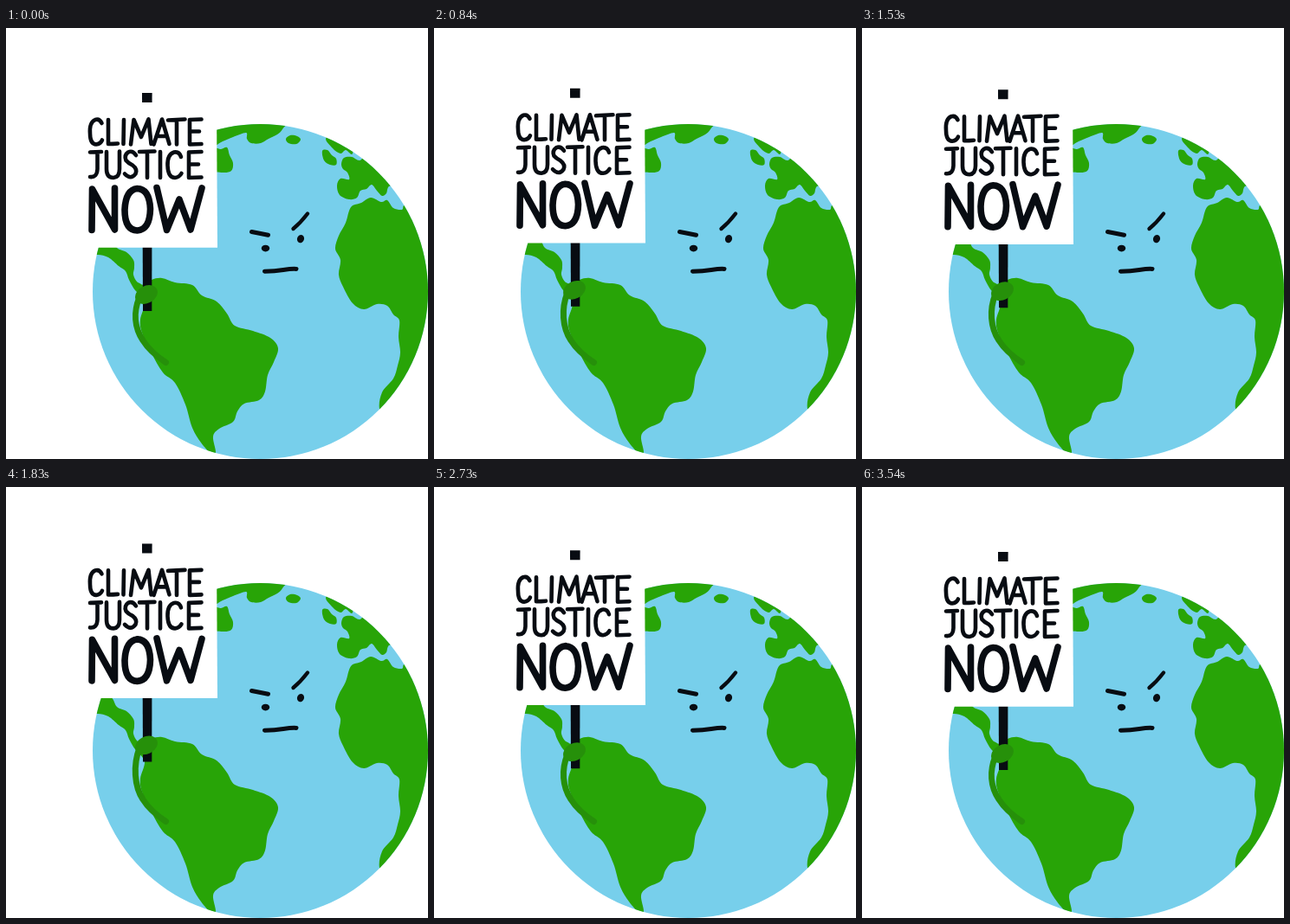
These frames come from a looping animation (487x498 px, 3600 ms). An HTML page:

```html
<!DOCTYPE html>
<html lang="en">
<head>
<meta charset="utf-8">
<title>Climate justice now</title>
<style>
  html, body { margin: 0; width: 100%; height: 100%; overflow: hidden; background: #fff; }
  svg { display: block; width: 487px; height: 498px; }
  .ink { fill: none; stroke: #080c12; stroke-linecap: round; stroke-linejoin: round; }
</style>
</head>
<body>
<svg viewBox="0 0 487 498" role="img" aria-label="Angry Earth holding a sign: CLIMATE JUSTICE NOW">
  <clipPath id="disc"><circle cx="293.5" cy="304.5" r="193.5"/></clipPath>
  <g clip-path="url(#disc)">
    <rect width="487" height="498" fill="#77cfeb"/>
    <g id="land" fill="#28a407"></g>
  </g>

  <g class="ink">
    <path stroke-width="5" d="M283.5 235.5Q292 237 302.5 239.3M298.5 281.2Q310 281 320 279.5T335 278.4"/>
    <path stroke-width="4.4" d="M331.5 232Q340 225 348 214.5"/>
  </g>
  <g fill="#080c12">
    <ellipse cx="299.5" cy="254.6" rx="4.7" ry="3.9"/>
    <ellipse cx="340" cy="243.6" rx="4" ry="4.7" transform="rotate(20 340 243.6)"/>
  </g>

  <g id="sign">
    <path fill="#080c12" d="M157 75H168.6L168.3 327H158Z"/>
    <path fill="#fff" d="M80 86H243L244 253.7H80Z"/>
    <g id="lettering" class="ink"></g>
  </g>
  <path id="arm" fill="none" stroke="#26900a" stroke-width="7" stroke-linecap="round"/>
  <ellipse id="hand" rx="13.6" ry="10" fill="#26900a"/>
</svg>
<script>
const SVG = 'http://www.w3.org/2000/svg';
const get = id => document.getElementById(id);

function add(parent, attrs) {
  const path = document.createElementNS(SVG, 'path');
  for (const key in attrs) path.setAttribute(key, attrs[key]);
  parent.append(path);
}

// Closed Catmull-Rom curve through "x,y x,y ..." points.
function smooth(text) {
  const pts = text.split(' ').map(p => p.split(',').map(Number));
  const at = i => pts[(i + pts.length) % pts.length];
  let d = 'M' + pts[0];
  pts.forEach((p, i) => {
    const before = at(i - 1), next = at(i + 1), after = at(i + 2);
    const c1 = p.map((v, a) => v + (next[a] - before[a]) / 6);
    const c2 = next.map((v, a) => v - (after[a] - p[a]) / 6);
    d += `C${c1} ${c2} ${next}`;
  });
  return d + 'Z';
}

const lands = {
  southAmerica: '156,298 168,291 180,289 195,294 215,297 226,309 243,316 255,330 264,344 285,350 305,358 314,370 309,386 302,401 299,420 292,430 275,434 267,443 262,455 246,463 239,472 242,490 237,492 225,479 215,462 207,435 195,410 181,398 168,376 157,352 155,337 160,318 153,306',
  centralAmerica: '95,262 98,240 120,242 128,254 139,259 147,268 148,277 147,285 151,293 158,298 156,308 149,303 142,291 138,281 130,275 118,265 106,262',
  africa: '398,207 410,202 421,196 433,201 440,199 447,208 457,210 463,206 500,230 500,400 440,450 431,440 434,421 447,405 452,390 455,375 453,357 454,338 447,331 440,321 428,319 413,325 400,318 389,299 384,285 386,268 380,255 384,240 392,225',
  europe: '387,157 390,150 399,149 408,153 420,148 448,176 441,184 439,191 434,194 428,188 422,181 416,186 409,188 405,196 396,198 385,193 382,182 386,174 396,175 394,167 389,163',
  britain: '365,142 371,141 376,147 381,151 381,158 374,158 367,153',
  scandinavia: '370,126 377,139 386,145 392,141 400,145 400,120',
  iceland: '323,128 328,124 336,125 340,129 335,134 326,133',
  greenland: '236,136 236,105 280,100 324,104 319,117 313,123 303,128 294,133 283,133 278,128 277,121 262,126 250,131',
  northAmerica: '238,140 248,140 255,138 258,147 262,156 260,165 250,167 238,163'
};
for (const name in lands) add(get('land'), { d: smooth(lands[name]) });

const lettering = [
  { width: 4.6, letters: [
    'M110.5 110Q108 104.500 103 106Q96 109 97 122Q97 134 104 134.500Q109 134 111 129.500',
    'M118 106V134Q124 134 129 133.500',
    'M136 106L135.500 134',
    'M144 134.500L147.500 106L156 126L164.500 105.500L167.500 134',
    'M170.500 134.500L180 105.500L188.500 134M174 125H185',
    'M187 106.500L206.500 105.500M197 106V134.500',
    'M225.500 105.500L212 106V134.500L225.500 134M212 119.500H223'] },
  { width: 4.6, letters: [
    'M97 143.500L110 143M105.500 143.500V163Q105 173 97 172',
    'M116 143V163Q116 173 124 173Q131 172.500 131 163V142.500',
    'M150 147Q146 141 141 143.500Q136 147 138.500 153Q141 156 146 158.500Q152 163 149.500 168.500Q144 176 137 168.500',
    'M154 143L171.500 142.500M163 143V173',
    'M178 143V173',
    'M202 149Q200 142.500 194 143.500Q186 146 186.500 159Q187 173 195 173Q200 172.500 202.500 168',
    'M225.500 143L211 143.500V173L225.500 172.500M211 157.500H222'] },
  { width: 7.6, letters: [
    'M99 233.500L99.500 186L125.500 233V185',
    'M151.500 185.500Q138 187 137 210Q137 233.500 151.500 234Q166 233 166.500 209Q165.500 186 151.500 185.500',
    'M174 184.500L185.500 233.500L200 198L213 233L226 185'] }
];
for (const { width, letters } of lettering)
  add(get('lettering'), { d: letters.join(''), 'stroke-width': width });

const BOB = { period: 720, height: 11, lowest: 0.925 };

// Poses last 60 and 90 ms in turn.
function poseTime(time) {
  const t = time - 30;
  const start = Math.floor(t / 150) * 150;
  return 30 + start + (t - start < 60 ? 0 : 60);
}

function draw(time) {
  const angle = 2 * Math.PI * (poseTime(time) / BOB.period - BOB.lowest);
  const lift = BOB.height * (1 - Math.cos(angle)) / 2;
  get('sign').setAttribute('transform', `translate(0 ${-lift})`);
  get('hand').setAttribute('transform', `translate(162 ${308 - lift}) rotate(-28)`);
  get('arm').setAttribute('d',
    `M154 ${311 - lift}C${147 - lift * 0.05} ${328 - lift * 0.7} 148 346 158 361Q166 374 184.500 386.500`);
}

const LOOP = 3600;
const began = performance.now();
function tick() {
  draw((performance.now() - began) % LOOP);
  requestAnimationFrame(tick);
}
tick();
</script>
</body>
</html>
```
